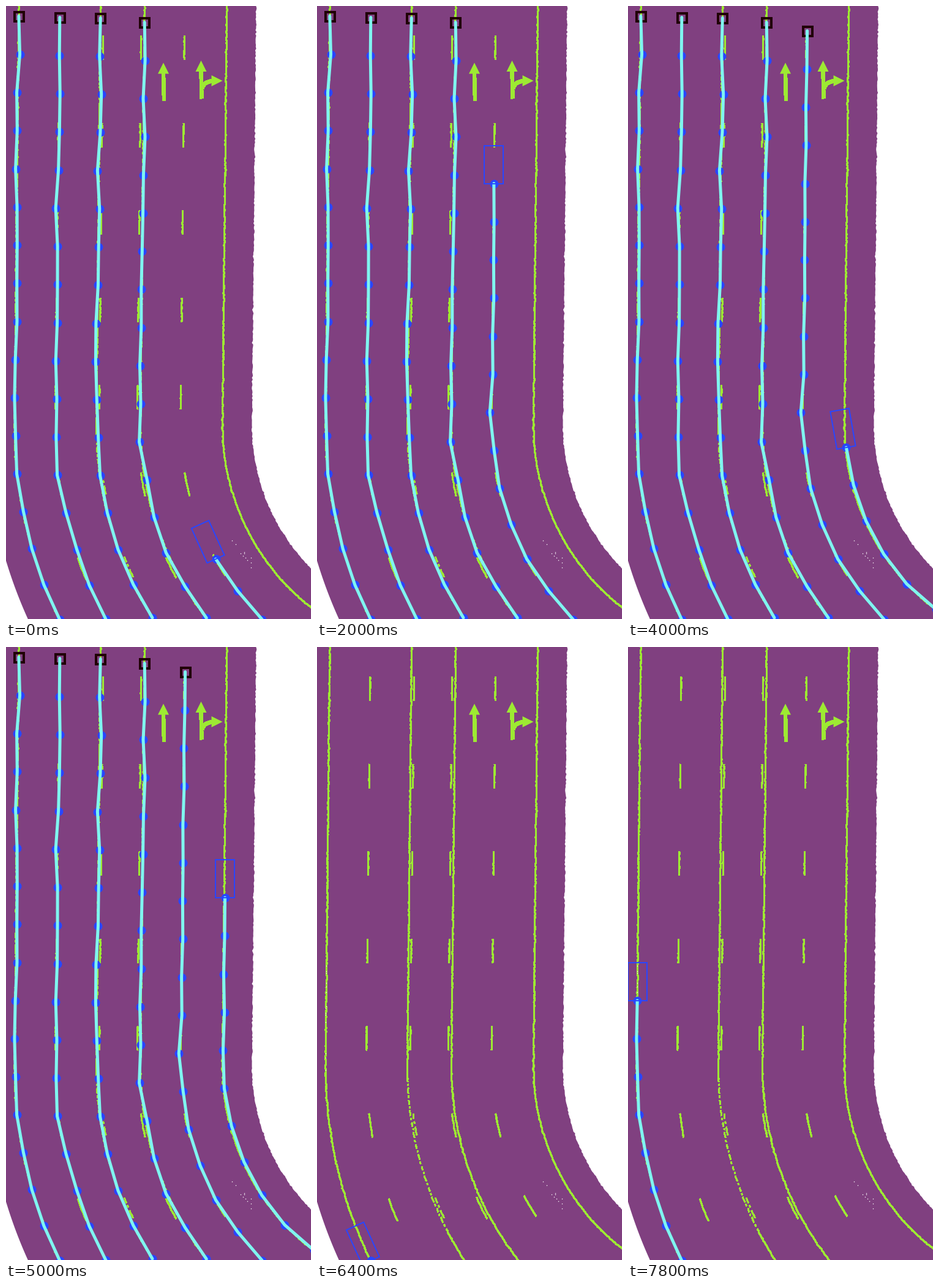
Recreate the animation shown at these times as a matplotlib script. Size 498 by 1000 pixels, loop 8 s.

```python
import numpy as np
import matplotlib.pyplot as plt
from matplotlib.animation import FuncAnimation
from matplotlib.patches import Polygon

W, H, DPI = 498, 1000, 100
PX = 72 / DPI
ROAD, PAINT, BLUE, CYAN, DARK = "#804080", "#9dea32", "#2846ff", "#7ff5f0", "#200004"

# Road: slightly leaning straight, then arcs around one common centre
CX, BEND = 730, 684
LEAN = 7 / BEND

# Traced lanes: x where the bend begins, y of the upper end
LANES = [(13.5, 16), (80.5, 18), (147, 19), (219, 26), (285.5, 40), (353.5, 35)]
COUNT, STEP = 17, 62.25
FIRST = 4 * COUNT + 2  # vertex reached when the loop starts
BOX_W, BOX_L = 31, 62
WORN = (0, (4, 2, 1.5, 2.5, 6, 2, 2, 3))

rng = np.random.default_rng(4)


def along(x0, s):
    """Points at distance s down the lane that enters the bend at x0."""
    s = np.asarray(s, float)
    radius = CX - x0
    angle = np.clip(s - BEND, 0, None) / radius
    x = x0 + LEAN * np.clip(BEND - s, 0, None) + radius * (1 - np.cos(angle))
    y = np.minimum(s, BEND) + radius * np.sin(angle)
    return np.array([x, y])


def rough(x0, start, end, jitter=0.4):
    """The same path with a slightly uneven edge."""
    x, y = along(x0, np.arange(start, end + 3, 3))
    return x + rng.normal(0, jitter, len(x)), y


def trace(x0, top):
    """Vertices from bottom to top; the inner ones stray a little."""
    x, y = along(x0, top + STEP * np.arange(COUNT))
    x[1:-1] += rng.normal(0, 1.4, COUNT - 2)
    return np.column_stack([x, y])[::-1]


fig = plt.figure(figsize=(W / DPI, H / DPI), dpi=DPI, facecolor="white")
ax = fig.add_axes([0, 0, 1, 1])
ax.set(xlim=(-0.5, W - 0.5), ylim=(H - 0.5, -0.5))  # whole numbers are pixel centres
ax.axis("off")


def paint(x, y, width=2.2, ls="-"):
    ax.plot(x, y, color=PAINT, lw=width * PX, ls=ls, solid_capstyle="butt",
            antialiased=False, zorder=2)


def specks(x, y):
    ax.plot(x, y, "s", color="white", ms=1.3 * PX, mew=0, zorder=3)


# Road surface
right = np.column_stack(rough(401, -3, 1000, 0.5))
left = np.column_stack(along(-33, np.arange(-3, 1040, 5)))
ax.add_patch(Polygon([*right, (W + 50, H + 10), *left[::-1]], fc=ROAD, ec="none", zorder=1))

# Solid lines; the second is worn along the bend
for x0 in (13.5, 219, 353):
    paint(*rough(x0, -3, 1060))
paint(*rough(147, -3, 703))
paint(*rough(147, 703, 960), 1.6, WORN)
paint(*rough(147, 960, 1040))

# Dashed lines
for x0 in (80, 151.5, 213.8, 284.5):
    for row in range(7):
        s = 48 + 142.6 * row
        worn = x0 == 151.5 and s > BEND
        paint(*rough(x0, s, s + 37, 0.25), ls=WORN if worn else "-")


def arrow_head(x, y, dx, dy, length=18, half=9):
    tip, d = np.array([x, y]), np.array([dx, dy])
    side = half * np.array([-dy, dx])
    ax.add_patch(Polygon([tip, tip - length * d + side, tip - length * d - side],
                         fc=PAINT, ec="none", zorder=2))


# Arrows: straight on, and straight on with a turn to the right
for x, y in ((256.5, 92), (318, 88.5)):
    arrow_head(x, y, 0, -1)
    paint([x, x + 1], [y + 16, y + 62], 5.6)
arrow_head(353, 121.5, 1, 0)
t = np.linspace(0, np.pi / 2, 12)
paint(337 - 17 * np.cos(t), 135 - 13 * np.sin(t), 6)

# Holes in the surface
hx = rng.uniform(364, 404, 11)
specks(hx, 857 + 1.4 * (hx - 364) + rng.normal(0, 6, 11))
hy = rng.uniform(515, 695, 14)
specks(along(13.5, hy)[0] - 0.5, hy)

# Moving parts
paths = [trace(*lane) for lane in LANES]
dots = [ax.plot([], [], "o", color=BLUE, ms=14 * PX, mew=0, zorder=4)[0] for _ in paths]
ends = [ax.plot([], [], "s", mfc="none", mec=DARK, ms=15 * PX, mew=4 * PX, zorder=5)[0]
        for _ in paths]
lines = [ax.plot([], [], color=CYAN, lw=5 * PX, solid_capstyle="round",
                 solid_joinstyle="round", zorder=6)[0] for _ in paths]
box = Polygon(np.zeros((4, 2)), fc="none", ec=BLUE, lw=2 * PX, joinstyle="miter", zorder=7)
ax.add_patch(box)


def search_box(at, ahead):
    """Box in front of a vertex; upright on the straight, tilted on the bend."""
    dx, dy = ahead - at
    angle = max(np.arctan2(-dx, -dy), np.radians(10)) if at[1] > BEND + 25 else 0
    forward = -BOX_L * np.array([np.sin(angle), np.cos(angle)])
    side = BOX_W / 2 * np.array([np.cos(angle), -np.sin(angle)])
    return [at - side, at + side, at + forward + side, at + forward - side]


def update(n):
    active, last = divmod((FIRST + n) % (COUNT * len(paths)), COUNT)
    for i, path in enumerate(paths):
        shown = COUNT if i < active else last + 1 if i == active else 0
        part = path[:shown]
        dots[i].set_data(*part[:COUNT - 1].T)
        lines[i].set_data(*(part.T if shown > 1 else ([], [])))
        ends[i].set_data(*path[COUNT - 1:shown].T)
    path = paths[active]
    box.set_visible(last < COUNT - 1)
    if last < COUNT - 1:
        box.set_xy(search_box(path[last], path[last + 1]))
    return [*dots, *ends, *lines, box]


anim = FuncAnimation(fig, update, frames=40, interval=200, repeat=True, repeat_delay=0)
plt.show()
```
